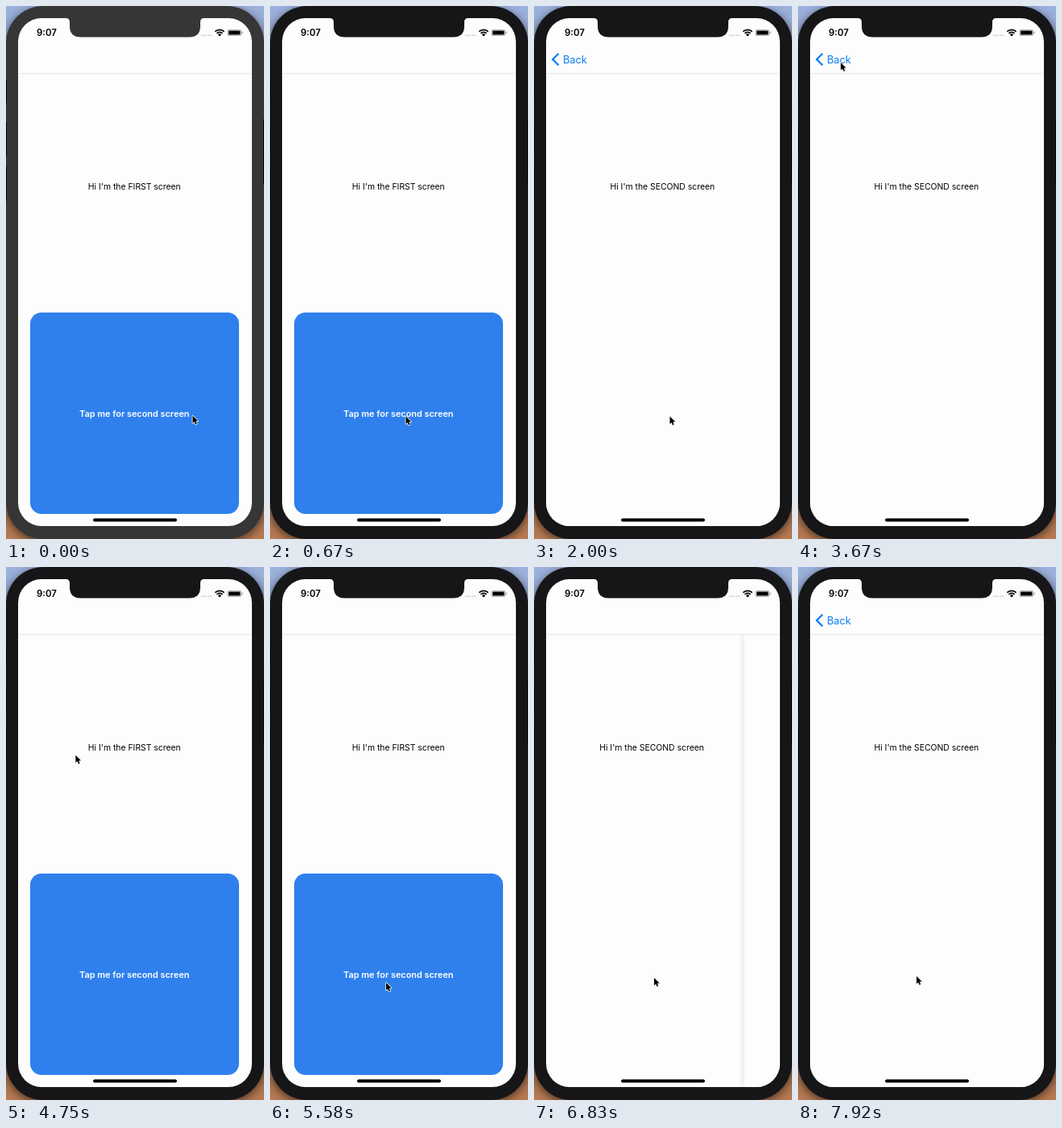
Write an HTML page with a canvas that moves like this. It is 320 by 659 pixels and loops after 8 s.

```html
<!DOCTYPE html>
<html lang="en">
<head>
<meta charset="utf-8">
<style>
  html, body { margin: 0; width: 100%; height: 100%; overflow: hidden; }
  canvas { display: block; width: 320px; height: 659px; }
</style>
</head>
<body>
<canvas id="stage"></canvas>
<script>
const W = 320, H = 659, LOOP = 8000;
const LEFT = 15, TOP = 15, WIDTH = 290, HEIGHT = 628, BAR_BOTTOM = 83;
const PAPER = '#fdfdfd', TINT = '#0a7cf5', FONT = 'Inter, sans-serif';

const canvas = document.getElementById('stage');
const ctx = canvas.getContext('2d');
const scale = window.devicePixelRatio || 1;
canvas.width = W * scale;
canvas.height = H * scale;

// Navigation transitions: start time, lower screen, upper screen
const transitions = [
  { at: 686, under: 'FIRST', over: 'SECOND' },
  { at: 3800, under: 'FIRST', over: 'SECOND', pop: true },
  { at: 6270, under: 'FIRST', over: 'SECOND' },
  { at: 6778, under: 'SECOND', over: 'SECOND' },
];

// Pointer tip: time, x, y
const pointerPath = [
  [0, 231.5, 506.5], [150, 231.5, 506.5], [650, 168.5, 507.5], [2200, 168.5, 507.5],
  [3400, 53, 70], [4300, 53, 70], [5400, 144, 514], [5700, 144, 514],
  [6200, 149, 508], [7000, 149, 508], [7600, 147, 506], [8000, 147, 506],
];

const clamp = v => Math.min(1, Math.max(0, v));
const smooth = v => v * v * (3 - 2 * v);

function spring(ms) {
  const x = Math.max(0, ms) * 0.013;
  return x > 9 ? 1 : 1 - (1 + x) * Math.exp(-x);
}

function pointerAt(t) {
  const i = Math.max(1, pointerPath.findIndex(p => p[0] > t));
  const [t0, x0, y0] = pointerPath[i - 1], [t1, x1, y1] = pointerPath[i];
  const k = smooth(clamp((t - t0) / (t1 - t0)));
  return [x0 + (x1 - x0) * k, y0 + (y1 - y0) * k];
}

function roundRect(x, y, w, h, r, fill) {
  ctx.beginPath();
  ctx.roundRect(x, y, w, h, r);
  ctx.fillStyle = fill;
  ctx.fill();
}

function text(str, x, y, size, color, weight = 400, align = 'center') {
  ctx.font = `${weight} ${size}px ${FONT}`;
  ctx.textAlign = align;
  ctx.fillStyle = color;
  ctx.fillText(str, x, y);
}

function drawScreen(name, dx, moving) {
  text(`Hi I'm the ${name} screen`, 159.3 + dx, 227.3, 10.4, '#000');
  if (name === 'FIRST') {
    roundRect(30 + dx, 379, 259, 249, 14, moving ? '#4b94ee' : '#2f80ed');
    text('Tap me for second screen', 159.3 + dx, 507.6, 10.9, '#fff', 600);
  }
}

function drawBody({ under, over }, p) {
  const edge = LEFT + WIDTH * (1 - p);
  const moving = p > 0.005 && p < 0.995;
  if (p < 0.999) drawScreen(under, -0.3 * WIDTH * p, moving);
  if (moving) {
    const shade = ctx.createLinearGradient(edge - 8, 0, edge, 0);
    shade.addColorStop(0, 'rgba(0,0,0,0)');
    shade.addColorStop(1, `rgba(0,0,0,${0.02 + 0.28 * p})`);
    ctx.fillStyle = shade;
    ctx.fillRect(edge - 8, BAR_BOTTOM, 8, H);
  }
  ctx.fillStyle = PAPER;
  ctx.fillRect(edge, BAR_BOTTOM, WIDTH, H);
  if (p > 0.001) drawScreen(over, edge - LEFT, moving);
}

function drawNavBar(backAlpha) {
  ctx.fillStyle = '#e6e6f2';
  ctx.fillRect(LEFT, BAR_BOTTOM, WIDTH, 1);
  ctx.globalAlpha = backAlpha;
  ctx.strokeStyle = TINT;
  ctx.lineWidth = 2.2;
  ctx.lineJoin = 'miter';
  ctx.beginPath();
  ctx.moveTo(30.5, 58.7);
  ctx.lineTo(23.2, 66);
  ctx.lineTo(30.5, 73.3);
  ctx.stroke();
  text('Back', 36, 70.8, 12.8, TINT, 400, 'left');
  ctx.globalAlpha = 1;
}

function drawStatus() {
  text('9:07', 38, 37.2, 11.4, '#000', 600, 'left');
  ctx.fillStyle = '#cbcbcb';
  for (let i = 0; i < 5; i++) ctx.fillRect(242 + i * 2.8, 35.5, 1.6, 1.6);

  ctx.strokeStyle = '#000';
  ctx.lineWidth = 1.8;
  for (const r of [8, 5]) {
    ctx.beginPath();
    ctx.arc(265, 37.3, r, -Math.PI * 0.75, -Math.PI * 0.25);
    ctx.stroke();
  }
  ctx.fillStyle = '#000';
  ctx.beginPath();
  ctx.moveTo(265, 37.5);
  ctx.arc(265, 37.5, 3, -Math.PI * 0.75, -Math.PI * 0.25);
  ctx.fill();

  roundRect(274.5, 29, 17.5, 8, 2.3, '#999');
  roundRect(275.3, 29.8, 15.9, 6.4, 1.7, PAPER);
  roundRect(276, 30.4, 14.5, 5.2, 1.2, '#000');
  roundRect(292.6, 31.6, 1.2, 2.8, 0.6, '#999');
}

function drawNotch(color) {
  ctx.beginPath();
  ctx.moveTo(74, 14);
  ctx.lineTo(74, 15);
  ctx.quadraticCurveTo(79, 15, 79, 20);
  ctx.lineTo(79, 25);
  ctx.quadraticCurveTo(79, 38.5, 93, 38.5);
  ctx.lineTo(227, 38.5);
  ctx.quadraticCurveTo(241, 38.5, 241, 25);
  ctx.lineTo(241, 20);
  ctx.quadraticCurveTo(241, 15, 246, 15);
  ctx.lineTo(246, 14);
  ctx.fillStyle = color;
  ctx.fill();
}

function drawPhone(bezel) {
  const backdrop = ctx.createLinearGradient(0, 0, 0, H);
  backdrop.addColorStop(0, '#9db2de');
  backdrop.addColorStop(0.5, '#5c5a60');
  backdrop.addColorStop(1, '#b87a52');
  ctx.fillStyle = backdrop;
  ctx.fillRect(0, 0, W, H);

  ctx.save();
  ctx.shadowColor = 'rgba(0,0,0,0.6)';
  ctx.shadowBlur = 12 * scale;
  ctx.shadowOffsetY = 3 * scale;
  roundRect(0, 0, W, H, 46, bezel);
  ctx.restore();

  ctx.fillStyle = '#080808';
  for (const [x, y, h] of [[0, 92, 28], [0, 144, 42], [0, 199, 42], [319, 140, 80]])
    ctx.fillRect(x, y, 1, h);
}

function drawPointer([x, y]) {
  const shape = [[0, 0], [0, 9.2], [2.1, 7.4], [3.6, 10.8], [5.2, 10.1], [3.8, 6.8], [6.6, 6.6]];
  ctx.beginPath();
  shape.forEach(([dx, dy]) => ctx.lineTo(x + dx, y + dy));
  ctx.closePath();
  ctx.lineJoin = 'round';
  ctx.lineWidth = 1.6;
  ctx.strokeStyle = '#f4f4f4';
  ctx.stroke();
  ctx.fillStyle = '#000';
  ctx.fill();
}

function draw(t) {
  const current = transitions.filter(s => s.at <= t).pop() || transitions[0];
  const eased = spring(t - current.at);
  const p = current.pop ? 1 - eased : eased;
  const bezel = t < 80 ? '#363636' : '#161618';

  ctx.setTransform(scale, 0, 0, scale, 0, 0);
  drawPhone(bezel);
  ctx.save();
  roundRect(LEFT, TOP, WIDTH, HEIGHT, 29, PAPER);
  ctx.clip();
  drawBody(current, p);
  drawNavBar(clamp((p - 0.7) / 0.3));
  drawStatus();
  ctx.restore();
  drawNotch(bezel);
  roundRect(108, 633.4, 104, 4.2, 2.1, '#000');
  drawPointer(pointerAt(t));
}

const start = performance.now();
function tick() {
  draw((performance.now() - start) % LOOP);
  requestAnimationFrame(tick);
}
tick();
</script>
</body>
</html>
```
